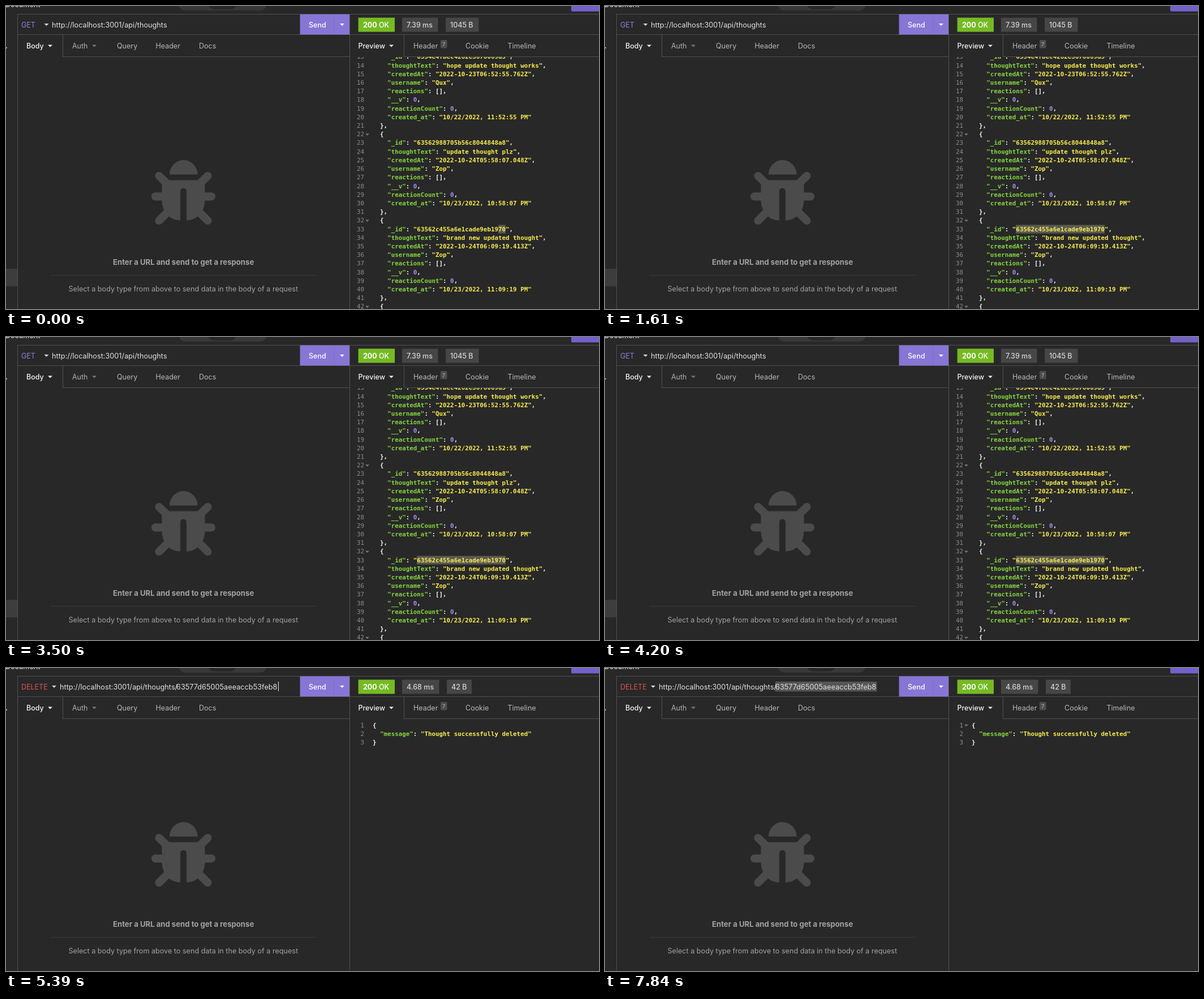
Write an HTML page that moves like this. It is 1048 by 535 pixels and loops after 8000 ms.

```html
<!DOCTYPE html>
<html lang="en">
<head>
<meta charset="utf-8">
<title>API client</title>
<style>
  html, body { margin: 0; width: 100%; height: 100%; overflow: hidden; background: #282828; }
  svg { display: block; width: 1048px; height: 535px; font: 12.5px Inter, sans-serif; }
  text { white-space: pre; }
  .mono { font: 700 10.85px "DejaVu Sans Mono", monospace; fill: #f4f4f2; }
  .gutter { font: 10.85px "DejaVu Sans Mono", monospace; fill: #8d8d8d; text-anchor: end; }
  .key { fill: #86d63f; }
  .str { fill: #f8ec4f; }
  .num { fill: #a492f5; }
</style>
</head>
<body>
<svg id="stage" viewBox="0 0 1048 535">
  <defs><clipPath id="pane"><rect x="608" y="90" width="440" height="445"/></clipPath></defs>
</svg>
<script>
const LOOP = 8000, SWITCH = 5390, STEP = 70;
const URL_SIZE = 12.72;
const stage = document.getElementById('stage');

function add(parent, tag, attrs, content = '') {
  const node = document.createElementNS('http://www.w3.org/2000/svg', tag);
  for (const name in attrs) node.setAttribute(name, attrs[name]);
  node.textContent = content;
  return parent.appendChild(node);
}
const group = (parent, attrs = {}) => add(parent, 'g', attrs);
const rect = (parent, x, y, width, height, fill, rx = 0) =>
  add(parent, 'rect', { x, y, width, height, fill, rx });
const path = (parent, d, fill) => add(parent, 'path', { d, fill });
const label = (parent, x, middle, content, fill = '#d6d6d6', weight = 400, size = 12.5) =>
  add(parent, 'text', { x, y: middle + size * 0.36, fill, 'font-weight': weight, 'font-size': size }, content);
const arrow = (parent, x, y, fill, width = 8) =>
  path(parent, `M${x} ${y - 2}h${width}l${-width / 2} ${width / 2}z`, fill);

function drawChrome() {
  const ui = group(stage);
  const rule = '#505050';
  label(ui, -1, -2.6, 'Document', '#d6d6d6', 500);
  rect(ui, 305, -16, 156, 24, '#383838', 12);
  rect(ui, 357, -14, 50, 20, '#282828', 10);
  rect(ui, 999, -12, 60, 21.5, '#7460ca', 2);
  path(ui, 'M-4 73h6.5l-4 4z', '#d6d6d6');

  rect(ui, 20, 14, 1028, 1, rule);
  rect(ui, 20, 14, 1, 521, rule);
  rect(ui, 607, 14, 1, 521, rule);
  rect(ui, 20, 50, 1028, 1, rule);
  rect(ui, 100, 89, 507, 1, rule);
  rect(ui, 703, 89, 345, 1, rule);
  rect(ui, 100, 51, 1, 39, rule);
  rect(ui, 703, 51, 1, 39, rule);

  rect(ui, 519.6, 14.6, 87.4, 35.8, '#8776d5');
  rect(ui, 579, 15, 1, 35, '#806fcf');
  label(ui, 535, 33, 'Send', '#fff', 500);
  arrow(ui, 590, 33, '#fff');

  label(ui, 36, 70.5, 'Body', '#f2f2f2', 500);
  arrow(ui, 74, 70.5, '#f2f2f2');
  label(ui, 117, 70.5, 'Auth', '#b0b0b0');
  arrow(ui, 152, 70.5, '#777');
  label(ui, 196, 70.5, 'Query', '#b8b8b8');
  label(ui, 264.5, 70.5, 'Header', '#b8b8b8');
  label(ui, 341, 70.5, 'Docs', '#b8b8b8');

  label(ui, 622.5, 70.5, 'Preview', '#f2f2f2', 500);
  arrow(ui, 677, 70.5, '#f2f2f2');
  label(ui, 720, 70.5, 'Header', '#b8b8b8');
  rect(ui, 768, 60, 11.5, 14.5, '#4d4d4d', 2);
  label(ui, 771, 67.5, '7', '#b8b8b8', 400, 9.5);
  label(ui, 812, 70.5, 'Cookie', '#b8b8b8');
  label(ui, 886.5, 70.5, 'Timeline', '#b8b8b8');

  label(ui, 189, 452.5, 'Enter a URL and send to get a response', '#a2a2a2', 700, 13.15);
  rect(ui, 79, 475, 469, 1, '#3b3b3b');
  label(ui, 110.5, 499.5, 'Select a body type from above to send data in the body of a request', '#a2a2a2', 400, 12.62);
}

function drawBug() {
  const bug = group(stage), gray = '#4b4b4b';
  const line = (d, stroke, width) =>
    add(bug, 'path', { d, stroke, 'stroke-width': width, 'stroke-linecap': 'round', fill: 'none' });
  path(bug, 'M289 297.5a24.8 25.5 0 0 1 49.6 0z', gray);
  line('M264 336.3H363', gray, 14.2);
  line('M270.5 300L285 314M356.5 300L342 314M270.5 379L285 364.5M356.5 379L342 364.5', gray, 14.2);
  path(bug, 'M275.5 307.5H351.5V342C351.5 364 337 378.5 319 378.5H308C290 378.5 275.5 364 275.5 342Z', gray);
  line('M313.5 327V386', '#282828', 11);
}

function drawStatus(parent, chips) {
  rect(parent, 622.6, 20.6, 64.4, 25, '#75ba24');
  label(parent, 631, 33, '200', '#fff', 700);
  label(parent, 659, 33, 'OK', '#fff', 500);
  for (const [x, width, textX, content] of chips) {
    rect(parent, x, 20.6, width, 25, '#464646');
    label(parent, textX, 33, content, '#d6d6d6', 500);
  }
}

function codeLine(parent, number, middle, indent, source, foldable) {
  add(parent, 'text', { class: 'gutter', x: 633, y: middle + 3.8 }, number);
  const row = add(parent, 'text', { class: 'mono', x: 648 + indent * 13.06, y: middle + 3.8 });
  for (const [token, key, str, num] of source.matchAll(/("[^"]*"(?=:))|("[^"]*")|(\b\d+\b)|[^"\d]+/g)) {
    add(row, 'tspan', { class: key ? 'key' : str ? 'str' : num ? 'num' : '' }, token);
  }
  return foldable && arrow(parent, 635, middle + 0.8, '#777', 7);
}

function recordLines({ id, thought, created, user, shown }) {
  return [
    '{',
    `"_id": "${id}",`,
    `"thoughtText": "${thought}",`,
    `"createdAt": "${created}",`,
    `"username": "${user}",`,
    '"reactions": [],',
    '"__v": 0,',
    '"reactionCount": 0,',
    `"created_at": "${shown}"`,
    '},'
  ];
}

const records = [
  { id: '6354e4fbec4282e3676069d3', thought: 'hope update thought works', created: '2022-10-23T06:52:55.762Z',
    user: 'Qux', shown: '10/22/2022, 11:52:55 PM' },
  { id: '63562988705b56c8044848a8', thought: 'update thought plz', created: '2022-10-24T05:58:07.048Z',
    user: 'Zop', shown: '10/23/2022, 10:58:07 PM' },
  { id: '63562c455a6e1cade9eb1970', thought: 'brand new updated thought', created: '2022-10-24T06:09:19.413Z',
    user: 'Zop', shown: '10/23/2022, 11:09:19 PM' }
];

drawChrome();
drawBug();

const listView = group(stage);
rect(listView, 0, 464, 20, 31, '#3d3d3d');
label(listView, 27, 33, 'GET', '#8f80dc');
arrow(listView, 67.5, 33, '#d6d6d6');
label(listView, 81, 33, 'http://localhost:3001/api/thoughts', '#e0e0e0', 400, URL_SIZE);
drawStatus(listView, [[700, 63.5, 708, '7.39 ms'], [777, 58.5, 785, '1045 B']]);
const listCode = group(listView, { 'clip-path': 'url(#pane)' });
const idMark = rect(listCode, 726, 386.5, 157, 15, '#5a5a52');
[...records.flatMap(recordLines), '{'].forEach((source, i) => {
  const number = 12 + i, brace = /^[{}]/.test(source);
  codeLine(listCode, number, 104.8 + (number - 14) * 15.21, brace ? 1 : 2, source, source === '{');
});

const deleteView = group(stage);
const urlMark = rect(deleteView, 301, 24, 179.5, 17.5, '#555');
label(deleteView, 27, 33, 'DELETE', '#e15251');
arrow(deleteView, 81, 33, '#d6d6d6');
label(deleteView, 95, 33, 'http://localhost:3001/api/thoughts/', '#e0e0e0', 400, URL_SIZE);
label(deleteView, 301, 33, '63577d65005aeeaccb53feb8', '#e0e0e0', 400, URL_SIZE);
const caret = rect(deleteView, 481, 24, 1, 17, '#e8e8e8');
drawStatus(deleteView, [[700, 65.5, 708, '4.68 ms'], [779, 44, 787, '42 B']]);
const foldArrow = codeLine(deleteView, 1, 101, 0, '{', true);
codeLine(deleteView, 2, 116, 1, '"message": "Thought successfully deleted"');
codeLine(deleteView, 3, 131.3, 0, '}');

const show = (node, on) => node.setAttribute('visibility', on ? 'inherit' : 'hidden');
const between = (t, from, to) => t >= from && t < to;

// Progress of a mouse drag that advances in even steps.
const drag = (t, start, steps) =>
  Math.min(1, Math.max(0, Math.floor((t - start) / STEP) + 1) / steps);

function selectFrom(mark, right, width, chars) {
  mark.setAttribute('x', right - width * chars / 24);
  mark.setAttribute('width', width * chars / 24);
}

function render(t) {
  const deleting = t >= SWITCH;
  show(listView, !deleting);
  show(deleteView, deleting);
  selectFrom(idMark, 883, 157, 2 + Math.round(22 * drag(t, 70, 11)));
  selectFrom(urlMark, 480.5, 179.5, Math.round(24 * drag(t, 7280, 9)));
  show(foldArrow, deleting && t >= 5810);
  show(caret, between(t, SWITCH, 5880) || between(t, 6440, 6930) || between(t, 7140, 7280));
}

const begin = performance.now();
function tick() {
  render((performance.now() - begin) % LOOP);
  requestAnimationFrame(tick);
}
render(0);
requestAnimationFrame(tick);
</script>
</body>
</html>
```
